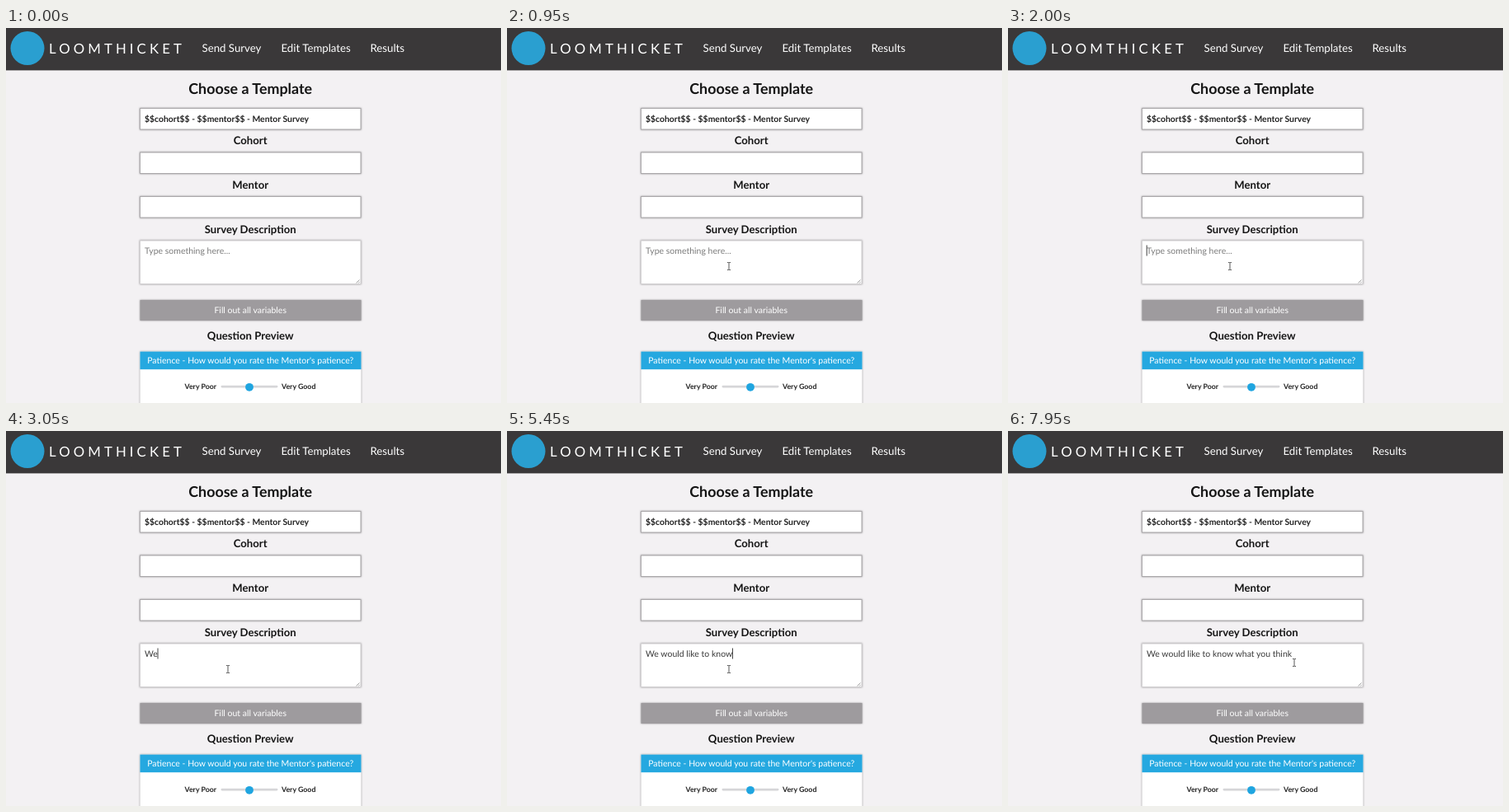
Recreate the animation shown at these times as an HTML page. Size 600 px wide and 455 px high, loop 8000 ms.

```html
<!DOCTYPE html>
<html lang="en">
<head>
<meta charset="utf-8">
<title>Survey form</title>
<style>
  html, body { margin: 0; width: 100%; height: 100%; overflow: hidden; background: #f3f1f3; }
  svg { display: block; width: 600px; height: 455px; font-family: Lato, "Open Sans", sans-serif; }
  text { white-space: pre; text-rendering: geometricPrecision; }
  .nav { font-size: 13.25px; fill: #fff; }
  .brand { font-size: 16.8px; letter-spacing: 4.1px; fill: #fff; }
  .mid { text-anchor: middle; }
  .title { font-size: 17.9px; font-weight: 700; fill: #151515; }
  .label { font-size: 13.15px; font-weight: 700; fill: #151515; }
  .value { font-size: 10.42px; font-weight: 700; fill: #222; }
  .body { font-size: 10.5px; }
  .caption { font-size: 8.8px; font-weight: 700; fill: #222; }
  .box { fill: #fff; stroke: #aaa8aa; filter: drop-shadow(.5px .5px 1px #0006); }
  .soft { stroke: #d2d0d2; }
  .raised { filter: drop-shadow(.5px .5px 1px #0006); }
</style>
</head>
<body>
<svg viewBox="0 0 600 455">
  <rect width="600" height="455" fill="#f3f1f3"/>
  <rect width="600" height="51.4" fill="#3a3839"/>
  <circle cx="26" cy="24.5" r="20.5" fill="#2a9fd0"/>
  <text class="brand" x="52" y="31">LOOMTHICKET</text>
  <text class="nav" x="237.5" y="29">Send Survey</text>
  <text class="nav" x="333.5" y="29">Edit Templates</text>
  <text class="nav" x="441.5" y="29">Results</text>

  <text class="title mid" x="296.2" y="80">Choose a Template</text>
  <rect class="box" x="162.5" y="97.5" width="267.5" height="25.5"/>
  <text class="value" x="168" y="113.7">$$cohort$$ - $$mentor$$ - Mentor Survey</text>
  <text class="label mid" x="296.2" y="141.2">Cohort</text>
  <rect class="box" x="162.5" y="151" width="267.5" height="25.5"/>
  <text class="label mid" x="296.2" y="195">Mentor</text>
  <rect class="box" x="162.5" y="204.5" width="267.5" height="25.5"/>
  <text class="label mid" x="296.2" y="248.5">Survey Description</text>
  <rect class="box soft" x="162.5" y="258" width="267.5" height="52.5"/>
  <path d="M424.5 309.5l4-4M427 309.5l1.5-1.5" stroke="#888" stroke-width=".8"/>
  <text id="typed" class="body" x="168" y="274"></text>
  <rect id="caret" y="263.5" width="1" height="13" fill="#444"/>

  <rect class="raised" x="162.5" y="330" width="268" height="25" fill="#9e9b9e"/>
  <text class="body mid" x="296.2" y="345.5" fill="#fff">Fill out all variables</text>
  <text class="label mid" x="296.2" y="378">Question Preview</text>
  <rect class="raised" x="162.5" y="392.6" width="268" height="70" fill="#fff"/>
  <rect x="162.5" y="392.6" width="268" height="21.6" fill="#25a8e0"/>
  <text class="body mid" x="296.2" y="407.3" fill="#fff">Patience - How would you rate the Mentor's patience?</text>
  <text class="caption" x="216.5" y="438">Very Poor</text>
  <text class="caption" x="334" y="438">Very Good</text>
  <rect x="260.5" y="433.7" width="69" height="2.8" rx="1.4" fill="#d6d6d8"/>
  <circle cx="295" cy="435.8" r="4.9" fill="#1fa5e0"/>

  <path id="pointer" d="M-2-4.5h1.5l.5.5.5-.5H2M0-4V4M-2 4.5h1.5L0 4l.5.5H2" fill="none" stroke="#444" stroke-width=".9"/>
</svg>
<script>
const LOOP = 8000, CLICK = 1850, BLINK = 530;
const MESSAGE = "We would like to know what you think";
// [time in ms, characters typed]
const TYPING = [[2700, 0], [3000, 2], [4430, 11], [6520, 32], [6920, 36]];
// [time in ms, x, y]
const POINTER = [[550, 426, 300], [850, 269, 289], [7720, 269, 289], [7900, 347, 281]];

const [typed, caret, pointer] = ["typed", "caret", "pointer"].map(id => document.getElementById(id));
const smooth = u => u * u * (3 - 2 * u);

function sample(keys, t, column, ease = u => u) {
  if (t <= keys[0][0]) return keys[0][column];
  const next = keys.findIndex(key => key[0] > t);
  if (next < 0) return keys[keys.length - 1][column];
  const a = keys[next - 1], b = keys[next];
  return a[column] + (b[column] - a[column]) * ease((t - a[0]) / (b[0] - a[0]));
}

function draw(t) {
  const count = Math.floor(sample(TYPING, t, 1));
  typed.textContent = count ? MESSAGE.slice(0, count) : "Type something here...";
  typed.setAttribute("fill", count ? "#3a3a3a" : "#7c7c7c");

  const typing = count > 0 && count < MESSAGE.length;
  const lastInput = count ? TYPING[TYPING.length - 1][0] : CLICK;
  const blinkOn = Math.floor((t - lastInput) / BLINK) % 2 === 0;
  caret.style.display = t >= CLICK && (typing || blinkOn) ? "" : "none";
  caret.setAttribute("x", 167.7 + (count ? typed.getComputedTextLength() : 0));

  const x = sample(POINTER, t, 1, smooth), y = sample(POINTER, t, 2, smooth);
  pointer.style.display = t >= POINTER[0][0] ? "" : "none";
  pointer.setAttribute("transform", `translate(${x} ${y})`);
}

const start = performance.now();
function frame() {
  draw((performance.now() - start) % LOOP);
  requestAnimationFrame(frame);
}
frame();
</script>
</body>
</html>
```
